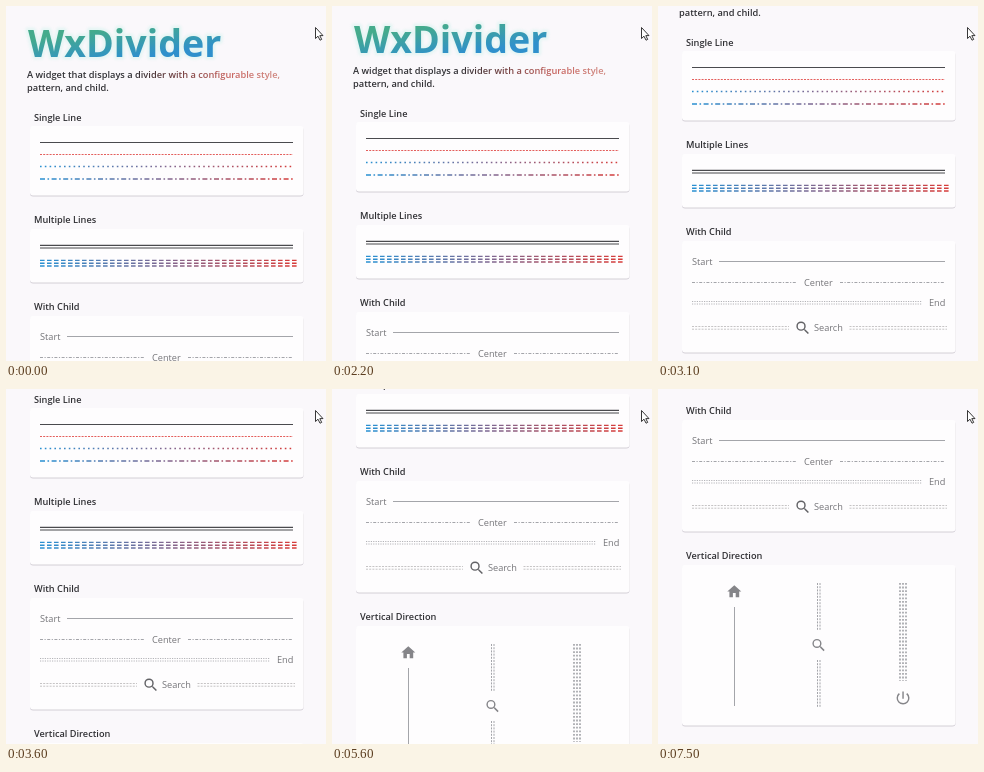
An HTML page that plays this animation: 320x355 px, repeating every 8.3 s.

```html
<!DOCTYPE html>
<html lang="en">
<head>
<meta charset="utf-8">
<title>WxDivider</title>
<style>
  html, body { margin: 0; width: 100%; height: 100%; overflow: hidden; background: #faf8fb; }
  body { position: relative; }
  svg { position: absolute; left: 0; top: 0; display: block; }
  text { font: 400 9.2px "Open Sans", "Noto Sans", sans-serif; fill: #747478; }
  .strong { font-weight: 600; fill: #303034; }
  .intro { font-size: 9.26px; }
  .title { font-size: 37.6px; font-weight: 700; }
  .halo { fill: #e6f5f4; stroke: #e6f5f4; stroke-width: 5; stroke-linejoin: round; filter: blur(.8px); }
  .card { fill: #fefdfe; filter: drop-shadow(0 1.1px .5px rgba(60, 50, 70, .2)); }
  .line { fill: none; stroke: #a4a5aa; }
  .dark { stroke: #4a4a4e; stroke-width: 1.2; }
  .fade { stroke: url(#blueRed); }
  .dashDot { stroke-dasharray: 3 1.5 1.2 1.5; }
  .dashes { stroke-dasharray: 2 1.2; }
  .dots { stroke-dasharray: 1.2 1.2; stroke: #b4b4b8; }
  .icon { fill: #858589; }

  /* Scrolling advances in 100 ms ticks. */
  #page { animation: scroll 8300ms infinite; will-change: transform; }
  @keyframes scroll {
    0%      { transform: translateY(0);      animation-timing-function: step-end; }
    21.686% { transform: translateY(0);      animation-timing-function: steps(4); }
    26.506% { transform: translateY(-4px);   animation-timing-function: step-end; }
    27.71%  { transform: translateY(-11px);  animation-timing-function: steps(4); }
    32.53%  { transform: translateY(-47px);  animation-timing-function: steps(2); }
    34.939% { transform: translateY(-63px);  animation-timing-function: steps(3); }
    38.554% { transform: translateY(-81px);  animation-timing-function: steps(4); }
    43.373% { transform: translateY(-101px); animation-timing-function: steps(3); }
    46.987% { transform: translateY(-113px); animation-timing-function: steps(2); }
    49.397% { transform: translateY(-117px); animation-timing-function: step-end; }
    57.831% { transform: translateY(-119px); animation-timing-function: step-end; }
    59.036% { transform: translateY(-125px); animation-timing-function: steps(4); }
    63.855% { transform: translateY(-189px); animation-timing-function: steps(2); }
    66.265% { transform: translateY(-211px); animation-timing-function: step-end; }
    67.469% { transform: translateY(-218px); animation-timing-function: step-end; }
    84.337% { transform: translateY(-222px); animation-timing-function: steps(3); }
    87.951% { transform: translateY(-264px); animation-timing-function: step-end; }
    89.156% { transform: translateY(-274px); animation-timing-function: step-end; }
    90.361%, 100% { transform: translateY(-279px); }
  }
</style>
</head>
<body>
<svg id="page" width="320" height="634" viewBox="0 0 320 634">
  <defs>
    <linearGradient id="blueRed" gradientUnits="userSpaceOnUse" x1="34" y1="0" x2="288" y2="0">
      <stop offset="0" stop-color="#2890d2"/>
      <stop offset=".5" stop-color="#81668f"/>
      <stop offset="1" stop-color="#d63c3a"/>
    </linearGradient>
    <linearGradient id="greenBlue" gradientUnits="userSpaceOnUse" x1="110" y1="22" x2="114" y2="53">
      <stop offset="0" stop-color="#45ab8c"/>
      <stop offset="1" stop-color="#2f90cc"/>
    </linearGradient>
    <linearGradient id="darkRed" gradientUnits="userSpaceOnUse" x1="21" y1="0" x2="274" y2="0">
      <stop offset=".42" stop-color="#303034"/>
      <stop offset=".62" stop-color="#7c4545"/>
      <stop offset=".8" stop-color="#c8645f"/>
      <stop offset="1" stop-color="#d08a82"/>
    </linearGradient>
    <path id="search" d="M15.5 14h-.79l-.28-.27A6.47 6.47 0 0 0 16 9.5a6.5 6.5 0 1 0-6.5 6.5c1.61 0 3.09-.59 4.23-1.57l.27.28v.79l5 4.99L20.49 19l-4.99-5zm-6 0a4.5 4.5 0 1 1 0-9 4.5 4.5 0 0 1 0 9z"/>
  </defs>

  <text class="title halo" x="22" y="51">WxDivider</text>
  <text class="title" x="22" y="51" style="fill:url(#greenBlue)">WxDivider</text>
  <text class="strong intro" x="21" y="71.5" style="fill:url(#darkRed)">A widget that displays a divider with a configurable style,</text>
  <text class="strong intro" x="21" y="84.5">pattern, and child.</text>

  <text class="strong" x="28" y="114.5">Single Line</text>
  <rect class="card" x="24" y="120" width="273.5" height="69.5" rx="3"/>
  <path class="line dark" d="M34 136.500H287"/>
  <path class="line" d="M34 148.500H287" stroke-dasharray="2 1.2" style="stroke:#e45f5d"/>
  <path class="line fade" d="M34 160.500H287" stroke-width="1.4" stroke-dasharray="1.6 3.2"/>
  <path class="line fade" d="M34 173H287" stroke-width="1.5" stroke-dasharray="5 2.5 1.6 2.5"/>

  <text class="strong" x="28" y="217">Multiple Lines</text>
  <rect class="card" x="24" y="223" width="273.5" height="53.5" rx="3"/>
  <path class="line dark" d="M34 239.300H287M34 242H287"/>
  <path class="line fade" d="M34 254.400H290.600M34 257.200H290.600M34 260H290.600" stroke-width="1.4" stroke-dasharray="4.6 2.4"/>

  <text class="strong" x="28" y="303.5">With Child</text>
  <rect class="card" x="24" y="310" width="273.5" height="111.5" rx="3"/>
  <text x="34" y="333.5">Start</text>
  <path class="line" d="M61 330.500H287"/>
  <path class="line dashDot" d="M34 351.500H138M182 351.500H287"/>
  <text x="146" y="354.5">Center</text>
  <path class="line dots" d="M34 370.500H264M34 373H264"/>
  <text x="271" y="375">End</text>
  <path class="line dashes" d="M34 395.500H131M34 398.200H131M191.500 395.500H289M191.500 398.200H289" style="stroke:#c6c4c5"/>
  <use href="#search" transform="translate(136.2 388.3) scale(.72)" fill="#626266"/>
  <text x="156" y="400">Search</text>

  <text class="strong" x="28" y="449">Vertical Direction</text>
  <rect class="card" x="24" y="455" width="273.5" height="160.5" rx="3"/>
  <path class="icon" transform="translate(67.9 473.2) scale(.7)" d="M10 20v-6h4v6h5v-8h3L12 3 2 12h3v8z"/>
  <path class="line" d="M76.500 497V596"/>
  <path class="line dashes" d="M159.500 473V521M162 473V521M159.500 550V598M162 550V598"/>
  <use class="icon" href="#search" transform="translate(152.3 526.8) scale(.7)"/>
  <path class="line" d="M242 473V571M245 473V571M248 473V571" stroke-width="1.7" stroke-dasharray="1.8 1.8"/>
  <path class="icon" transform="translate(236.4 579.4) scale(.72)" d="M13 3h-2v10h2V3zm4.83 2.17-1.42 1.42A6.92 6.92 0 0 1 19 12a7 7 0 1 1-11.42-5.42L6.17 5.17A9 9 0 1 0 17.83 5.17z"/>
</svg>

<svg width="320" height="355" viewBox="0 0 320 355">
  <path d="M309.500 21.500V32.500L312 30.200 314 34.200 315.700 33.400 313.800 29.600H317z" fill="#fff" stroke="#222" stroke-width=".9"/>
</svg>
</body>
</html>
```
